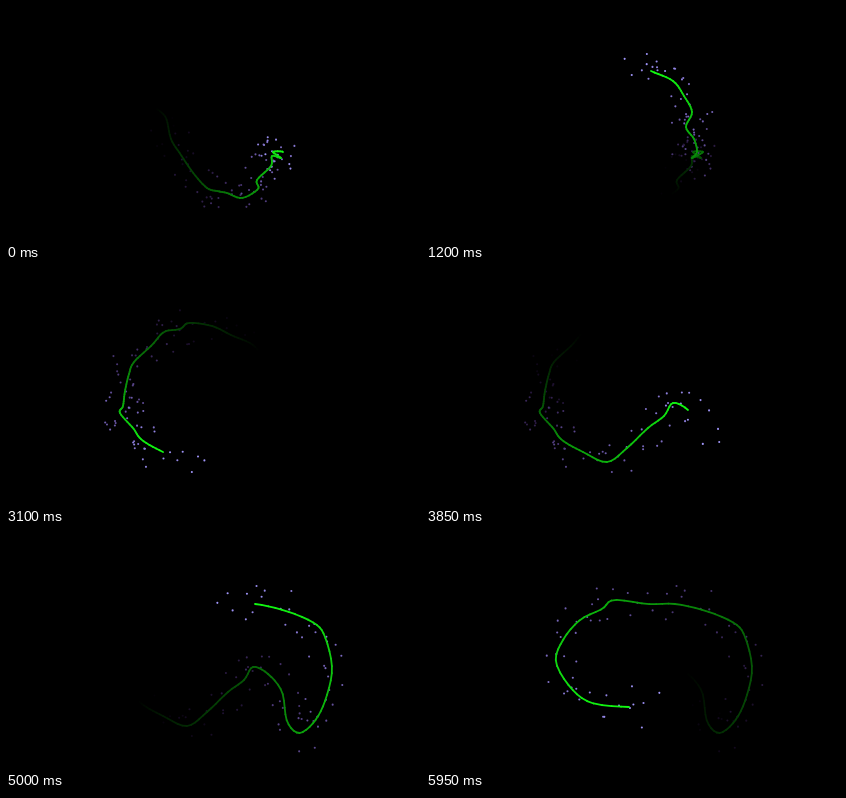
An HTML page with a canvas for the animation above (6000 ms loop, 414 by 236 pixels).

```html
<!DOCTYPE html>
<html lang="en">
<head>
<meta charset="utf-8">
<title>Fading trail</title>
<style>
  html, body { margin: 0; width: 100%; height: 100%; overflow: hidden; background: #000; }
  canvas { display: block; }
</style>
</head>
<body>
<canvas id="stage" width="414" height="236"></canvas>
<script>
const ctx = document.getElementById('stage').getContext('2d');
const LOOP = 6000, STEP = 50, LIFE = 2100, LEAD = 130, SPREAD = 22;

// Each leg: its end time, then x, y pairs reached at even intervals.
const legs = [
  [0, 160,112, 165,133, 175,149, 188,168, 201,182, 211,185, 221,187, 236,192,
    252,183, 251,174, 265,160, 266,150, 275,152, 267,146, 277,146],
  [1200, 266,152, 271,146, 268,133, 260,121, 266,106, 258,90, 247,75, 225,65],
  [2100, 206,56, 183,53, 174,59, 158,62, 146,75, 128,92, 123,104],
  [3100, 119,121, 117,136, 114,143, 127,158, 136,170, 157,182],
  [3850, 181,192, 201,178, 222,158, 238,146, 247,133, 262,140],
  [5000, 276,158, 281,187, 293,199, 308,188, 319,167, 326,135, 319,103, 308,89, 280,77, 249,70],
  [5950, 222,70, 188,66, 176,75, 154,86, 137,106, 130,128, 145,154, 166,169, 203,173],
  [6150, 222,171]
];

const path = [{ t: -LIFE, x: 151, y: 103 }];
for (const [end, ...xy] of legs) {
  const start = path[path.length - 1].t;
  for (let i = 0; i < xy.length; i += 2) {
    path.push({ t: start + (end - start) * (i + 2) / xy.length, x: xy[i], y: xy[i + 1] });
  }
}

function spline(a, b, c, d, k) {
  return b + k / 2 * (c - a + k * (2 * a - 5 * b + 4 * c - d + k * (3 * (b - c) + d - a)));
}

function pointAt(t) {
  let i = 1;
  while (i < path.length - 1 && path[i].t < t) i++;
  const b = path[i - 1], c = path[i];
  const a = path[i - 2] || b, d = path[i + 1] || c;
  const k = (t - b.t) / (c.t - b.t);
  return { t, x: spline(a.x, b.x, c.x, d.x, k), y: spline(a.y, b.y, c.y, d.y, k) };
}

let seed = 2718;
function random() {
  seed = (seed * 16807) % 2147483647;
  return seed / 2147483647;
}

// Two sparks per step, scattered around a point just ahead of the line.
const trail = [], sparks = [];
for (let t = -LIFE; t < LOOP; t += STEP) {
  trail.push(pointAt(t), pointAt(t + STEP / 2));
  const p = pointAt(t + LEAD);
  for (let i = 0; i < 2; i++) {
    const angle = random() * Math.PI * 2, r = SPREAD * Math.pow(random(), 0.6);
    sparks.push({ t, x: p.x + r * Math.cos(angle), y: p.y + r * Math.sin(angle) });
  }
}

function drawTrail(now) {
  ctx.lineWidth = 1.8;
  ctx.lineCap = 'round';
  for (let i = 1; i < trail.length; i++) {
    const p = trail[i - 1], q = trail[i];
    if (q.t > now) break;
    const fade = 1 - (now - q.t) / LIFE;
    if (fade <= 0) continue;
    ctx.strokeStyle = `rgb(${18 * fade},${250 * fade},${18 * fade})`;
    ctx.beginPath();
    ctx.moveTo(p.x, p.y);
    ctx.lineTo(q.x, q.y);
    ctx.stroke();
  }
}

function drawSparks(now) {
  for (const s of sparks) {
    const fade = 1 - (now - s.t) / LIFE;
    if (fade <= 0 || fade > 1) continue;
    ctx.fillStyle = `rgb(${160 * fade},${150 * Math.pow(fade, 1.3)},${250 * fade})`;
    ctx.beginPath();
    ctx.arc(s.x, s.y, 1.05, 0, Math.PI * 2);
    ctx.fill();
  }
}

function frame() {
  const now = Math.floor(performance.now() % LOOP / STEP) * STEP;
  ctx.fillStyle = '#000';
  ctx.fillRect(0, 0, 414, 236);
  drawSparks(now);
  drawTrail(now);
  requestAnimationFrame(frame);
}
frame();
</script>
</body>
</html>
```
